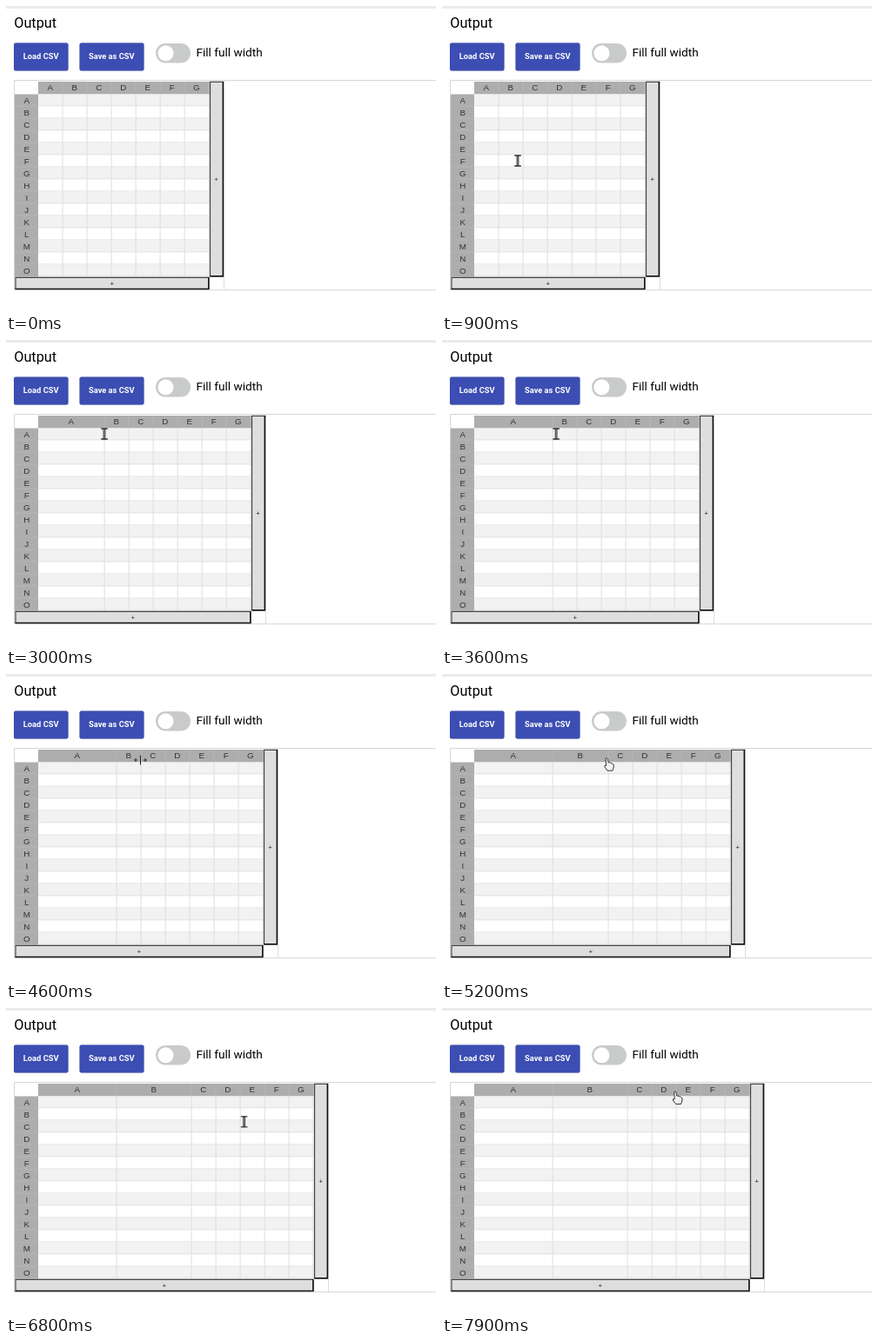
These frames come from a looping animation (494x352 px, 8 s). An HTML page:

```html
<!DOCTYPE html>
<html lang="en">
<head>
<meta charset="utf-8">
<title>Resizable table</title>
<style>
  html, body { margin: 0; width: 100%; height: 100%; overflow: hidden; background: #fff; }
  svg { display: block; width: 494px; height: 352px; }
  text { font-family: Roboto, sans-serif; fill: #000; }
  .button rect { fill: #3c4db3; filter: drop-shadow(0 .5px .5px #0005); }
  .button text { fill: #fff; font-size: 9.3px; font-weight: 700; text-anchor: middle; }
  .label { font: 9.8px "Liberation Sans", Arial, sans-serif; fill: #333; text-anchor: middle; }
  .plus { font: 8px "Liberation Sans", Arial, sans-serif; fill: #222; text-anchor: middle; }
</style>
</head>
<body>
<svg viewBox="0 0 494 352">
  <rect width="494" height="3" fill="#ebebeb"/>
  <text x="9.2" y="25" font-size="16.3">Output</text>
  <g class="button">
    <rect x="9" y="42.5" width="62.5" height="32" rx="2"/>
    <text x="40.2" y="61.2">Load CSV</text>
    <rect x="84.5" y="42.5" width="74" height="32" rx="2"/>
    <text x="121.3" y="61.2">Save as CSV</text>
  </g>
  <rect x="172" y="43" width="40" height="22.5" rx="11.25" fill="#c9caca"/>
  <circle cx="183.5" cy="54.3" r="9" fill="#fff"/>
  <text x="218.5" y="58" font-size="13.6">Fill full width</text>

  <path d="M494 85.5H9.5V326.7H494" fill="none" stroke="#d6d6d6"/>
  <g id="table"></g>
  <g id="labels"></g>
  <g id="cursor">
    <g id="beam" fill="none">
      <path d="M-3.8-6H3.8M-3.8 6H3.8" stroke="#333" stroke-width="1.3"/>
      <path d="M0-6V6" stroke="#333" stroke-width="2.8"/>
      <path d="M0-5V5" stroke="#aaa" stroke-width=".9"/>
    </g>
    <g id="resize" fill="none" stroke="#222">
      <path d="M.5-5.5V5.5M-3 0H-6M-4.5-2L-6.5 0L-4.5 2M4 0H7M5.5-2L7.5 0L5.5 2"/>
    </g>
    <path id="hand" fill="#f2f2f2" stroke="#333" stroke-linejoin="round"
      d="M-2.8-6.5Q-1.6-7.8-.6-6.3L.3-1.8Q2-2.6 2.7-1.2Q4.3-1.8 4.9-.2Q6.7-.3 6.5 2L6 5L5 7.5H-.8L-4.2 3Q-4.6 1-2.3 1.8Z"/>
  </g>
</svg>
<script>
const LOOP = 8000, TICK = 100;
const LEFT = 36.6, TOP = 101.5, ROW = 14, ROWS = 15, CELL = 28, HEIGHT = ROWS * ROW;
const GREY = "#adadad", GREY_LINE = "#b6b6b6", LINE = "#dedede";

const byId = id => document.getElementById(id);
const set = (node, attrs) => {
  for (const name in attrs) node.setAttribute(name, attrs[name]);
  return node;
};
const add = (parent, tag, attrs, text = "") => {
  const node = document.createElementNS("http://www.w3.org/2000/svg", tag);
  node.textContent = text;
  return byId(parent).appendChild(set(node, attrs));
};

// The pointer travels in straight lines between these stops
const stops = [
  { at: 0, x: 125, y: 365 },
  { at: 900, x: 87, y: 178 },
  { at: 2000, x: 69, y: 107 },
  { at: 2200, x: 65, y: 99 },
  { at: 2400, x: 65, y: 99 },
  { at: 3000, x: 113, y: 108 },
  { at: 3500, x: 127, y: 108 },
  { at: 4300, x: 160, y: 108 },
  { at: 4600, x: 154, y: 99 },
  { at: 4700, x: 154, y: 99 },
  { at: 5500, x: 213, y: 106.5 },
  { at: 5800, x: 219, y: 106.5 },
  { at: 6300, x: 294, y: 270 },
  { at: 6900, x: 269.5, y: 103 },
  { at: LOOP, x: 269.5, y: 103 }
];

function pointerAt(t) {
  const i = stops.findIndex(stop => stop.at > t);
  const from = stops[i - 1], to = stops[i];
  const k = (t - from.at) / (to.at - from.at);
  return { x: from.x + (to.x - from.x) * k, y: from.y + (to.y - from.y) * k };
}

// A column edge follows the pointer during its drag and stays where it is dropped
function dragWidth(t, start, end, left) {
  if (t <= start) return CELL;
  return Math.round(pointerAt(Math.min(t, end)).x - left);
}

const stripes = [add("table", "rect", { y: 87, height: TOP - 87, fill: GREY })];
add("table", "rect", { x: 10, y: TOP, width: LEFT + .4 - 10, height: HEIGHT, fill: GREY });
for (let i = 0; i < ROWS; i++) {
  const y = TOP + i * ROW, line = { y: y + ROW - 1, height: 1 };
  stripes.push(add("table", "rect", { y, height: ROW, fill: i % 2 ? "#fff" : "#f2f2f2" }));
  stripes.push(add("table", "rect", { ...line, fill: LINE }));
  add("table", "rect", { ...line, x: 10, width: LEFT + .4 - 10, fill: GREY_LINE });
  add("labels", "text", { class: "label", x: 23.8, y: y + 10.3 }, String.fromCharCode(65 + i));
}
const columns = [..."ABCDEFG"].map(letter => ({
  label: add("labels", "text", { class: "label", y: 97.4 }, letter),
  head: add("table", "rect", { y: 87, width: 1, height: TOP - 87, fill: GREY_LINE }),
  line: add("table", "rect", { y: TOP, width: 1, height: HEIGHT, fill: LINE })
}));

const margin = add("table", "path", { fill: "none", stroke: LINE });
const bars = add("table", "path", { fill: "#dedede", stroke: "#444", "stroke-width": 1.2 });
const edges = add("table", "path", { fill: "none", stroke: "#111", "stroke-width": 1.5 });
const sidePlus = add("labels", "text", { class: "plus", y: 202 }, "+");
const footPlus = add("labels", "text", { class: "plus", y: 322 }, "+");

function drawTable(widths) {
  let x = LEFT;
  columns.forEach(({ label, head, line }, i) => {
    const width = widths[i] ?? CELL;
    set(label, { x: x + width / 2 + .2 });
    x += width;
    set(head, { x });
    set(line, { x });
  });
  stripes.forEach(stripe => set(stripe, { x: LEFT + .4, width: x - LEFT + .6 }));
  set(margin, { d: `M${x + 17.9} 86V326` });
  set(bars, { d: `M${x + 1.9} 87.3h14.9V310.8h-14.9zM11 312.4H${x + .2}V325.5H11z` });
  set(edges, { d: `M${x + 16.8} 87V310.8h-15M${x + .2} 312V325.5H10.6` });
  set(sidePlus, { x: x + 9 });
  set(footPlus, { x: (10 + x) / 2 + .5 });
}

function draw(now) {
  const t = Math.floor(now % LOOP / TICK) * TICK;
  const { x, y } = pointerAt(t);
  const widthA = dragWidth(t, 2400, 3500, LEFT);
  const widthB = dragWidth(t, 4700, 5500, LEFT + widthA);
  drawTable([widthA, widthB]);

  const shape = y >= 104 ? "beam" : t < 5000 ? "resize" : "hand";
  for (const id of ["beam", "resize", "hand"])
    set(byId(id), { visibility: id === shape ? "visible" : "hidden" });
  set(byId("cursor"), { transform: `translate(${x} ${y})` });
}

const start = performance.now();
function tick() {
  draw(performance.now() - start);
  requestAnimationFrame(tick);
}
tick();
</script>
</body>
</html>
```
